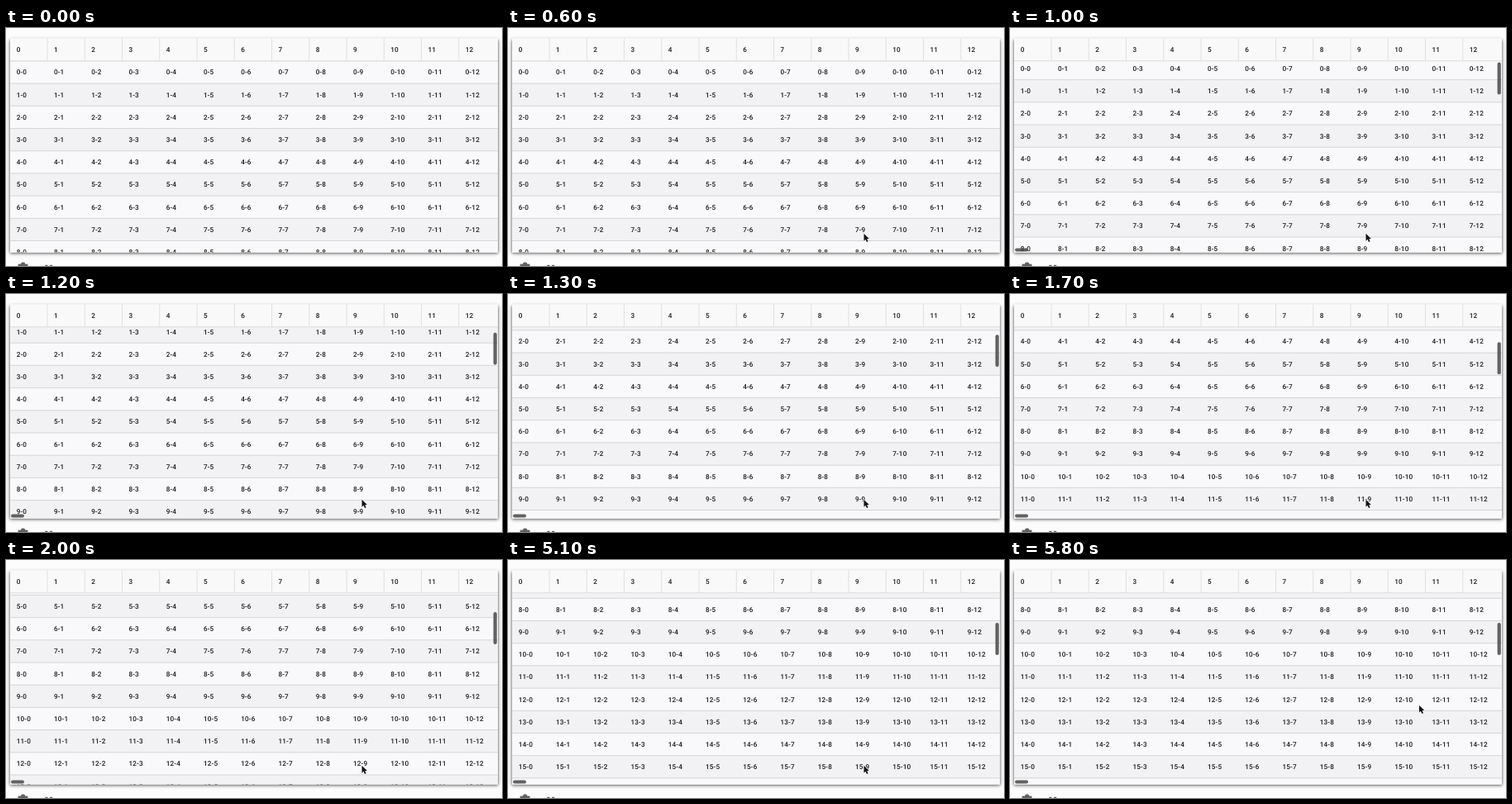
Recreate the animation shown at these times as an HTML page with a canvas. Size 600 by 288 pixels, loop 8 s.

```html
<!DOCTYPE html>
<html lang="en">
<head>
<meta charset="utf-8">
<title>Scrolling table</title>
<style>
html, body { margin: 0; width: 100%; height: 100%; overflow: hidden; background: #fdfcfd; }
canvas { display: block; }
</style>
</head>
<body>
<canvas id="stage" width="600" height="288"></canvas>
<script>
const ctx = document.getElementById('stage').getContext('2d');
const LOOP = 8000, STEP = 100;
const COLS = 13, COL_W = 45.25, ROW_H = 27.2;
const card = { x: 5, y: 12.6, w: 590, h: 259 };
const bodyTop = card.y + 27.3;
const bottom = card.y + card.h;

// Piecewise scroll: [time, offset]; the last move is a jump.
const scrollKeys = [[900, 0], [1000, 4.5], [1300, 50.4], [1500, 80.2], [1800, 117], [2000, 133.5]];

function along(keys, t) {
  if (t <= keys[0][0]) return keys[0][1];
  for (let i = 1; i < keys.length; i++) {
    const [t0, v0] = keys[i - 1], [t1, v1] = keys[i];
    if (t <= t1) return v0 + (v1 - v0) * (t - t0) / (t1 - t0);
  }
  return keys[keys.length - 1][1];
}

const scrollAt = t => t >= 5100 ? 211.2 : along(scrollKeys, t);

function cursorAt(t) {
  if (t < 500) return null;
  if (t < 600) return [430.5, 258.5];
  const k = Math.min(1, Math.max(0, (t - 5400) / 400));
  const e = k * k * (3 - 2 * k);
  return [430.5 + 64.4 * e, 248.8 - 73 * e];
}

function rect(x, y, w, h, color) {
  ctx.fillStyle = color;
  ctx.fillRect(x, y, w, h);
}

function pill(x, y, w, h, color) {
  ctx.fillStyle = color;
  ctx.beginPath();
  ctx.roundRect(x, y, w, h, Math.min(w, h) / 2);
  ctx.fill();
}

function shadow(blur, dy, alpha) {
  ctx.save();
  ctx.shadowColor = `rgba(0,0,0,${alpha})`;
  ctx.shadowBlur = blur;
  ctx.shadowOffsetY = dy;
  rect(card.x, card.y, card.w, card.h, '#fafafa');
  ctx.restore();
}

// Text is drawn in enlarged units so that it is placed between whole pixels.
function cells(y, label) {
  const zoom = 0.5;
  ctx.save();
  ctx.scale(zoom, zoom);
  ctx.font = '500 16.4px Roboto, Arial, sans-serif';
  ctx.letterSpacing = '0.3px';
  ctx.textRendering = 'geometricPrecision';
  ctx.fillStyle = '#1c1c1c';
  const base = y + ROW_H / 2 + 2.9;
  for (let c = 0; c < COLS; c++) ctx.fillText(label(c), (12.7 + c * COL_W) / zoom, base / zoom);
  ctx.restore();
}

function drawRows(scroll) {
  ctx.save();
  ctx.beginPath();
  ctx.rect(card.x, bodyTop, card.w, bottom - bodyTop);
  ctx.clip();
  const first = Math.floor(scroll / ROW_H);
  for (let r = first; r < first + 10; r++) {
    const y = bodyTop + r * ROW_H - scroll;
    rect(card.x, y, card.w, ROW_H, r % 2 ? '#f2f1f3' : '#f9f8fa');
    rect(card.x, y - 0.5, card.w, 1, '#d6d5d7');
    cells(y, c => `${r}-${c}`);
  }
  ctx.restore();
}

function drawHeader() {
  rect(card.x, card.y, card.w, bodyTop - card.y, '#faf9fa');
  rect(card.x, bodyTop - 0.6, card.w, 1, '#dcdcdc');
  for (let c = 1; c < COLS; c++) rect(4.3 + c * COL_W, card.y, 1, bodyTop - card.y, '#e0e0e0');
  cells(card.y, String);
}

function drawBars(scroll) {
  const color = 'rgba(72,72,72,0.85)';
  pill(589.6, 40.8 + scroll / 6, 4.2, 39, color);
  pill(6, 266.4, 16, 4.2, color);
}

function drawIcons() {
  const color = '#606060';
  pill(18, 283.6, 5.2, 4, color);
  rect(14.6, 285.6, 11.8, 2.4, color);
  rect(47.3, 286.8, 3.2, 1.2, color);
  rect(53, 286.8, 3.2, 1.2, color);
}

function drawCursor([x, y]) {
  ctx.save();
  ctx.translate(x, y);
  ctx.scale(0.95, 0.95);
  ctx.beginPath();
  [[0, 0], [0, 9.3], [2.1, 7.4], [3.7, 10.8], [5.4, 10], [3.9, 6.8], [6.7, 6.6]]
    .forEach(p => ctx.lineTo(...p));
  ctx.closePath();
  ctx.lineJoin = 'round';
  ctx.lineWidth = 1.2;
  ctx.strokeStyle = '#fff';
  ctx.stroke();
  ctx.fillStyle = '#111';
  ctx.fill();
  ctx.restore();
}

function draw(time) {
  const t = Math.floor(time / STEP) * STEP;
  const scroll = scrollAt(t), cursor = cursorAt(t);
  rect(0, 0, 600, 288, '#fdfcfd');
  shadow(5, 1, 0.4);
  shadow(3, 1, 0.45);
  drawRows(scroll);
  drawHeader();
  if (t >= 1000) drawBars(scroll);
  drawIcons();
  if (cursor) drawCursor(cursor);
}

const start = performance.now();
function tick() {
  draw((performance.now() - start) % LOOP);
  requestAnimationFrame(tick);
}
tick();
</script>
</body>
</html>
```
